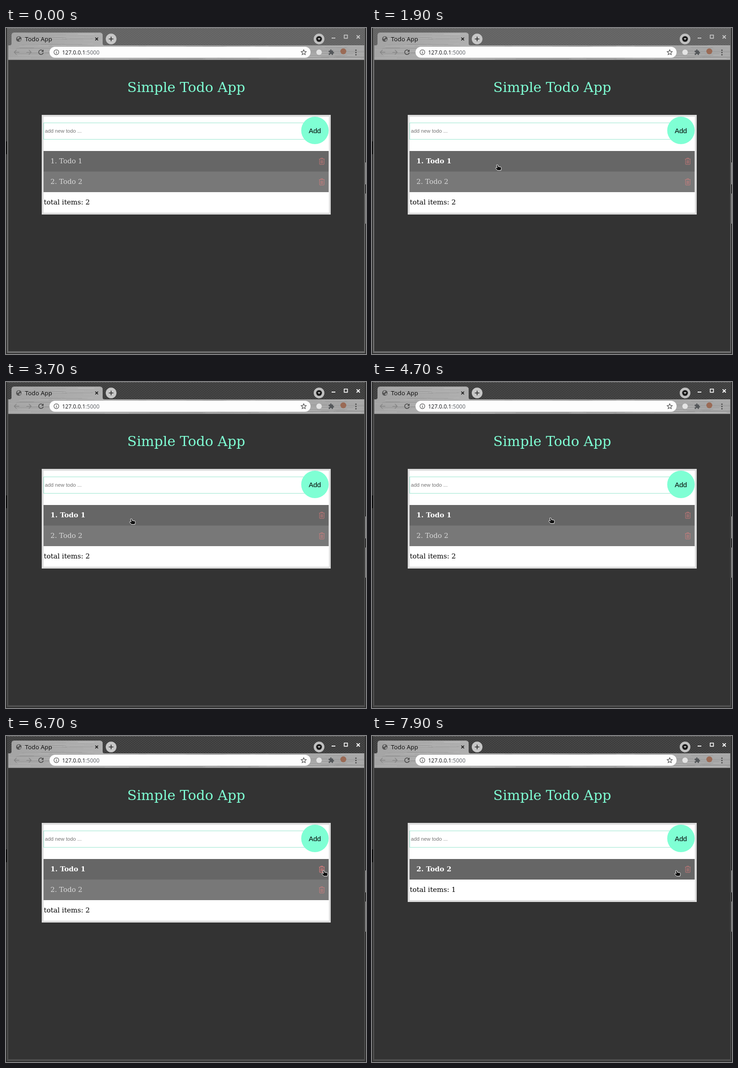
Write an HTML page that moves like this. It is 786 px wide and 713 px high and loops after 8000 ms.

```html
<!DOCTYPE html>
<html lang="en">
<head>
<meta charset="utf-8">
<title>Todo App</title>
<style>
  html, body { margin: 0; width: 100%; height: 100%; overflow: hidden; background: #333; }
  svg { display: block; width: 786px; height: 713px; }
  text { white-space: pre; }
  .serif { font: 15px "DejaVu Serif", serif; }
  .sans { font-family: "Liberation Sans", Arial, sans-serif; }
  .ui { font-family: "Noto Sans", sans-serif; }
  .row text { fill: #d8d8d8; }
  .row.hover text { fill: #fff; font-weight: bold; }
  .struck { text-decoration: line-through; }
  .trash { fill: none; stroke: #f08080; opacity: .65; }
  .trash.hover { opacity: .95; }
</style>
</head>
<body>
<svg viewBox="0 0 786 713">
  <defs>
    <pattern id="weave" width="6" height="4" patternUnits="userSpaceOnUse">
      <rect width="6" height="4" fill="#464646"/>
      <path d="M0 .5h3M3 2.5h3" stroke="#2b2b2b"/>
      <path d="M0 1.5h2M3 3.5h2" stroke="#535353"/>
    </pattern>
    <linearGradient id="metal" x2="1" y2=".05">
      <stop offset="0" stop-color="#a3a3a3"/>
      <stop offset=".3" stop-color="#b0b0b0"/>
      <stop offset=".6" stop-color="#a2a2a2"/>
      <stop offset="1" stop-color="#aaa"/>
    </linearGradient>
    <clipPath id="chrome"><path id="chromeShape" d="M5 70V38H8Q12 38 12 34V16Q12 10 18 10H205Q211 10 211 16V34Q211 38 215 38H782V70Z"/></clipPath>
    <g id="trash">
      <path d="M683.5 286.5h12M687.5 286v-1.5h4V286M684.5 287v10q0 1.5 1.5 1.5h7q1.5 0 1.5-1.5v-10M687.5 289v7.5M689.5 289v7.5M691.5 289v7.5"/>
    </g>
  </defs>

  <!-- window frame -->
  <rect width="786" height="713" fill="#2c2c2c"/>
  <rect y="248" width="2" height="28" fill="#000"/>
  <rect x="785" y="294" width="1" height="48" fill="#eee"/>
  <rect x="785" y="362" width="1" height="66" fill="#ddd"/>
  <rect x="2" width="782" height="711" fill="#4e4e4e"/>
  <rect x="2" width="782" height="38" fill="url(#weave)"/>
  <rect x="2" width="782" height="1" fill="#666"/>
  <g fill="none" stroke="#fff" stroke-width="2">
    <path d="M711 22h8M765.500 16l7 7m0-7l-7 7"/>
    <rect x="738.500" y="15.500" width="7" height="7" stroke-width="1.700"/>
  </g>
  <rect id="dim" x="2" width="782" height="711" fill="#8c8c8c"/>

  <!-- tab and toolbar -->
  <use href="#chromeShape" fill="url(#metal)"/>
  <g id="streaks" clip-path="url(#chrome)"></g>
  <g fill="#555">
    <circle cx="28" cy="24" r="6"/>
    <path d="M24 22l3-3 3 1-2 3-3 1zM28 26l4-2 1 2-3 3z" fill="#a4a4a4"/>
  </g>
  <text class="ui" x="41.500" y="29" font-size="13.333" fill="#111">Todo App</text>
  <path d="M195 21l6 6m0-6l-6 6" stroke="#111" stroke-width="1.700"/>
  <circle cx="229.500" cy="24" r="11.700" fill="#c6c6c6"/>
  <path d="M224.500 24h10M229.500 19v10" stroke="#222" stroke-width="1.600"/>
  <circle cx="683.500" cy="24" r="11.700" fill="#c0c0c0"/>
  <circle cx="683.500" cy="24" r="6.300" fill="#1c1c1c"/>
  <path d="M680.500 22.500h6l-3 3.500z" fill="#ddd"/>

  <g fill="none" stroke-width="1.600">
    <path d="M29 53H18.500M23 48l-5 5 5 5M44.500 53H55M50 48l5 5-5 5" stroke="#858585"/>
    <path d="M80 49.500a5 5 0 1 0 1.300 4.500" stroke="#474747"/>
  </g>
  <path d="M82 47v5h-5z" fill="#474747"/>
  <rect x="95" y="41" width="570" height="24" rx="12" fill="#fdfdfd"/>
  <circle cx="110" cy="53" r="5.300" fill="none" stroke="#555" stroke-width="1.200"/>
  <path d="M110 52v4M110 49.700v1.300" stroke="#555" stroke-width="1.300"/>
  <text class="ui" x="122.500" y="57.500" font-size="12" fill="#202124">127.0.0.1<tspan fill="#666a6f">:5000</tspan></text>
  <path d="M650 47.500l1.600 3.700 4 .4-3 2.700.9 4-3.500-2.100-3.500 2.100.9-4-3-2.700 4-.4z" fill="none" stroke="#505050" stroke-width="1.200"/>
  <circle cx="683.500" cy="53" r="6" fill="#e4e4e4"/>
  <path transform="translate(703.300 46.300) scale(.57)" fill="#54575a" d="M20.500 11H19V7c0-1.100-.9-2-2-2h-4V3.500a2.500 2.500 0 0 0-5 0V5H4c-1.100 0-2 .9-2 2v3.800h1.500a2.700 2.700 0 0 1 0 5.400H2V20c0 1.100.9 2 2 2h3.800v-1.500a2.700 2.700 0 0 1 5.400 0V22H17c1.100 0 2-.9 2-2v-4h1.500a2.500 2.500 0 0 0 0-5z"/>
  <circle cx="736.500" cy="51" r="6.500" fill="#9a6a55"/>
  <g fill="#4a4a4a"><circle cx="764" cy="48.500" r="1.500"/><circle cx="764" cy="53.500" r="1.500"/><circle cx="764" cy="58.500" r="1.500"/></g>

  <!-- page -->
  <rect x="5" y="70" width="777" height="637" fill="#333"/>
  <rect x="5" y="69" width="777" height="1" fill="#8b8b8b"/>
  <text class="serif" x="393.500" y="140" text-anchor="middle" style="font-size:30px" fill="#7fffd4">Simple Todo App</text>
  <rect id="card" x="80" y="192" width="627" fill="#fff" stroke="#ddd" stroke-width="4"/>
  <rect x="82.500" y="207.500" width="590" height="36" fill="#fff" stroke="#98e6cf"/>
  <text class="sans" x="85" y="229" font-size="11.250" fill="#757575">add new todo ...</text>
  <circle cx="674.500" cy="224" r="30" fill="#7fffd4"/>
  <text class="sans" x="674.300" y="230" font-size="15" text-anchor="middle">Add</text>

  <g class="row" id="first">
    <rect x="82" y="269" width="622.500" height="45" fill="#666"/>
    <text class="serif" x="97" y="296"><tspan id="number"></tspan><tspan id="label"></tspan></text>
    <use id="bin" class="trash" href="#trash"/>
  </g>
  <g class="row" id="second">
    <rect x="82" y="314" width="622.500" height="45" fill="#787878"/>
    <text class="serif" x="97" y="341">2. Todo 2</text>
    <use class="trash" href="#trash" y="45"/>
  </g>
  <text class="serif" id="total" x="82.500"></text>

  <g id="cursor" stroke="#fff" stroke-linejoin="round">
    <path id="arrow" d="M.5 .5V13.500l3-2.800 2.400 5.300 2-.9-2.400-5.100H9.500z" fill="#111"/>
    <path id="hand" d="M-1.200 .8Q.4-.8 2 .8L2.600 4 8 5Q9.500 5.500 9.500 7.500L8.500 12.500H1L-3.500 7.500Q-3 5.500-1.300 6.200L.2 7z" fill="#111"/>
    <path id="beam" d="M-3-8Q0-8 0-6V6Q0 8-3 8M3-8Q0-8 0-6M0 6Q0 8 3 8" fill="none" stroke="#222"/>
  </g>
</svg>
<script>
const LOOP = 8000, TICK = 100;
const FOCUS = 2200, UNSTRIKE = 3700, REMOVE = 7100;

// pointer hotspot: [time, x, y]
const path = [
  [100, 95, -30], [200, 101, 0], [500, 128, 45], [800, 168, 111], [1000, 209, 178],
  [1300, 245, 245], [1500, 259, 272], [1900, 273, 299], [4100, 273, 299], [4400, 307, 299],
  [4500, 307, 299], [4700, 389, 297], [4800, 389, 297], [5200, 605, 285], [5400, 605, 285],
  [5500, 636, 291], [5800, 719, 302], [5900, 719, 302], [6000, 715, 302], [6100, 715, 302],
  [6300, 705, 301], [6400, 705, 301], [6700, 693, 294], [7600, 693, 294], [7900, 664, 294]
];

const el = id => document.getElementById(id);
const show = (id, on) => el(id).setAttribute('visibility', on ? 'visible' : 'hidden');
const clamp = v => Math.max(0, Math.min(1, v));

function pointerAt(t) {
  const next = Math.max(1, path.findIndex(p => p[0] >= t));
  const [t0, x0, y0] = path[next - 1], [t1, x1, y1] = path[next];
  const k = clamp((t - t0) / (t1 - t0));
  return [x0 + (x1 - x0) * k, y0 + (y1 - y0) * k].map(Math.round);
}

function brushMetal() {
  let seed = 7;
  const random = () => (seed = seed * 16807 % 2147483647) / 2147483647;
  let lines = '';
  for (let i = 0; i < 240; i++) {
    const x = 5 + random() * 740, y = 10 + Math.floor(random() * 60) + .5;
    const tone = random() < .55 ? '#fff' : '#555';
    lines += `<path d="M${x} ${y}h${30 + random() * 90}" stroke="${tone}" opacity="${random() * .22}"/>`;
  }
  el('streaks').innerHTML = lines;
}

function draw(time) {
  const t = Math.floor(time / TICK) * TICK;
  const [x, y] = pointerAt(t);
  const removed = t >= REMOVE;
  const inside = x >= 82 && x < 705;
  const overRow = inside && y >= 269 && y < 314;
  const overInput = inside && y >= 207 && y < 244;

  el('dim').setAttribute('opacity', .48 * (1 - clamp((t - FOCUS + TICK) / (2 * TICK))));
  el('number').textContent = removed ? '2. ' : '1. ';
  el('label').textContent = removed ? 'Todo 2' : 'Todo 1';
  el('label').classList.toggle('struck', t >= FOCUS && t < UNSTRIKE);
  el('first').classList.toggle('hover', overRow);
  el('bin').classList.toggle('hover', overRow && x >= 682 && x < 697);
  show('second', !removed);
  el('card').setAttribute('height', removed ? 169 : 214);
  el('total').setAttribute('y', removed ? 341 : 386);
  el('total').textContent = 'total items: ' + (removed ? 1 : 2);

  el('cursor').setAttribute('transform', `translate(${x} ${y})`);
  show('hand', overRow);
  show('beam', overInput);
  show('arrow', !overRow && !overInput);
}

brushMetal();
const start = performance.now();
(function frame() {
  draw((performance.now() - start) % LOOP);
  requestAnimationFrame(frame);
})();
</script>
</body>
</html>
```
